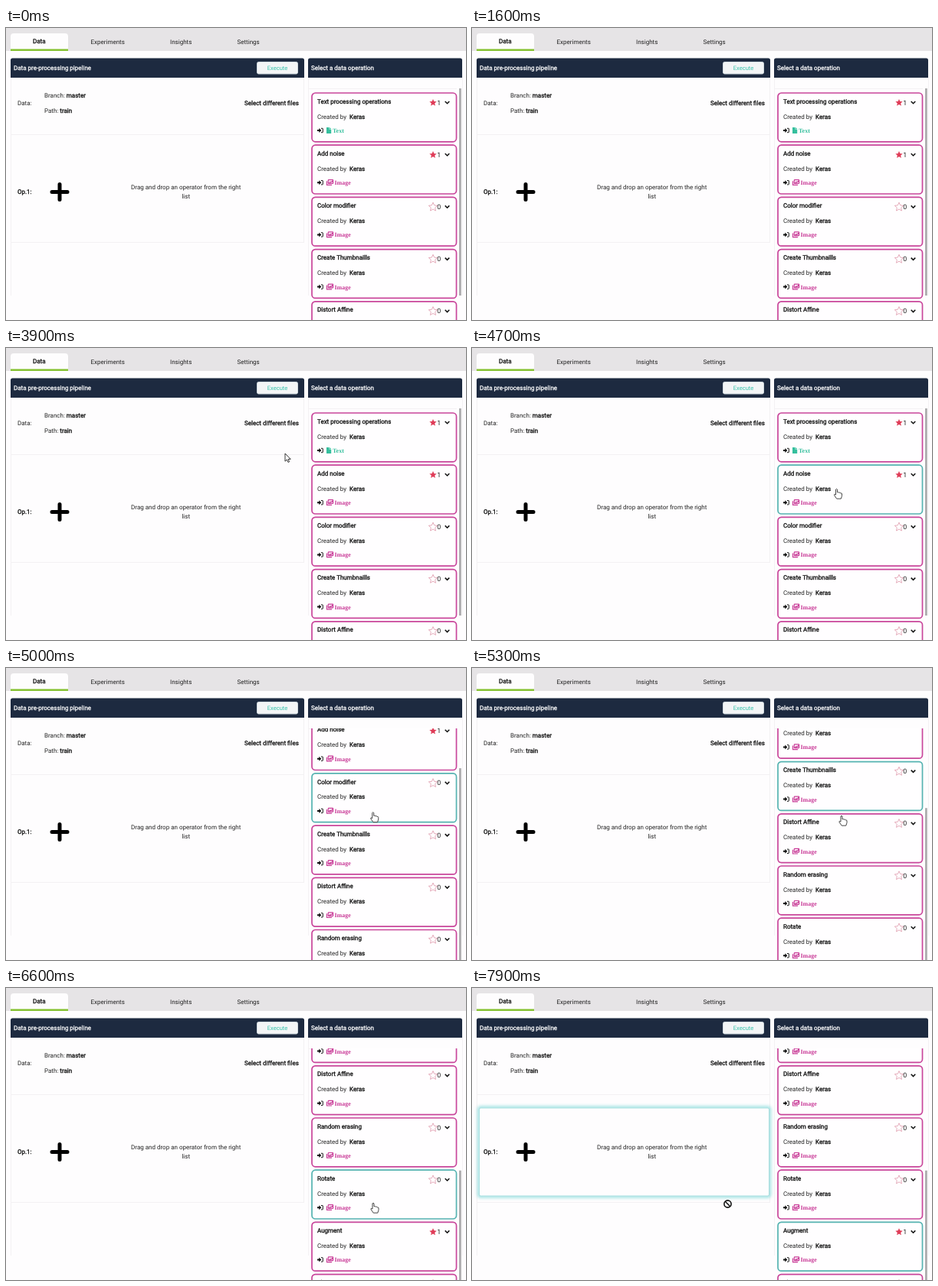
Recreate the animation shown at these times as an HTML page. Size 600 by 382 pixels, loop 8 s.

```html
<!DOCTYPE html>
<html>
<head>
<meta charset="utf-8">
<style>
html, body { margin: 0; width: 100%; height: 100%; overflow: hidden; background: #fefdfe; }
svg { display: block; width: 600px; height: 382px; }
text { font: 8px Roboto, sans-serif; fill: #222; white-space: pre; text-rendering: geometricPrecision; }
.b { fill: #0c0c0c; stroke: #0c0c0c; stroke-width: .3px; }
.w { fill: #fff; stroke: #fff; stroke-width: .3px; }
.tag { font: bold 8px "Liberation Serif", serif; }
.count { font-size: 8.8px; }
.line { fill: none; stroke: #f3f1f3; }
.box { fill: #fffeff; stroke: #c9469b; stroke-width: 1.7; }
.hover .box { stroke: #55b3b1; }
</style>
</head>
<body>
<svg viewBox="0 0 600 382">
  <defs>
    <clipPath id="view"><rect x="394" y="79" width="201" height="303"/></clipPath>
    <filter id="blur" x="-10%" y="-20%" width="120%" height="140%"><feGaussianBlur stdDeviation="2"/></filter>
  </defs>
  <rect width="600" height="30" fill="#e6e4e6"/>
  <path d="M6 30V11q0-4 4-4h67q4 0 4 4V30z" fill="#fefdfe"/>
  <path d="M6 27.5H81V30H6z" fill="#86c232"/>
  <text x="35" y="20" class="b">Data</text>
  <text x="110.5" y="21">Experiments</text>
  <text x="214" y="21">Insights</text>
  <text x="301.5" y="21">Settings</text>

  <path class="line" d="M6.5 65V350M388.5 65V280M6 139.5H389M6 280.5H389M394.5 65V350M595.5 65V350M394 79.5H588"/>
  <path d="M6 65V42q0-2.5 2.5-2.5H386.5q2.500 0 2.500 2.500V65zM394 65V42q0-2.500 2.500-2.500H592.500q2.500 0 2.500 2.500V65z" fill="#1d2a40"/>
  <text x="10" y="54.700" class="w">Data pre-processing pipeline</text>
  <text x="398" y="54.700" class="w">Select a data operation</text>
  <rect x="327.500" y="44.500" width="53" height="15.500" rx="2" fill="#f3f5f6" stroke="#cfd9de"/>
  <text x="354" y="55" text-anchor="middle" style="font-size:7.6px;fill:#3cc4ae">Execute</text>

  <text x="15" y="101">Data:</text>
  <text x="50" y="91">Branch: <tspan class="b">master</tspan></text>
  <text x="50" y="111">Path: <tspan class="b">train</tspan></text>
  <text x="311" y="101" class="b">Select different files</text>

  <g id="zone">
    <rect x="9" y="156.500" width="379" height="116" rx="2" fill="none" stroke="#35c4c4" stroke-width="3" opacity=".65" filter="url(#blur)"/>
    <rect x="9.500" y="157" width="378" height="115" rx="2" fill="#fefdfe" stroke="#a9dfe0"/>
  </g>
  <text x="15" y="217.200" class="b">Op.1:</text>
  <path d="M60 214.600H80M70 204.600V224.600" stroke="#000" stroke-width="5" stroke-linecap="round"/>
  <text x="234.700" y="211" text-anchor="middle">Drag and drop an operator from the right</text>
  <text x="234.700" y="223" text-anchor="middle">list</text>

  <g clip-path="url(#view)"><g id="list"></g></g>
  <rect id="thumb" x="591" y="79" width="2.800" height="271" fill="#adacae"/>

  <g id="arrow"><path d="M0 0V10.200L2.400 8L4 11.500L5.600 10.800L4.100 7.400H7.200z" fill="#fff" stroke="#222" stroke-width=".9"/></g>
  <g id="hand"><path d="M-1 1Q0-.6 1 1V4.800Q2.500 4.200 3.200 5.200Q4.600 4.700 5.200 5.800Q6.800 5.500 7 7V9.500L5.800 13.200H.2L-3 8.600Q-3.600 6.600-1 8z" fill="#fff" stroke="#333" stroke-width=".9"/></g>
  <g id="ban" fill="none" stroke="#111" stroke-width="1.600"><circle r="4.600" fill="#fff"/><path d="M-3.200-3.200L3.200 3.200"/></g>
</svg>
<script>
const LOOP = 8000, STEP = 100, PITCH = 68.2;
const $ = id => document.getElementById(id);

const ops = [["Text processing operations", 1], ["Add noise", 1], ["Color modifier", 0],
  ["Create Thumbnaills", 0], ["Distort Affine", 0], ["Random erasing", 0],
  ["Rotate", 0], ["Augment", 1], ["Flip", 0]];

function star(r) {
  const pts = Array.from({ length: 10 }, (_, i) => {
    const a = i * Math.PI / 5, d = i % 2 ? r * .47 : r;
    return (557 + d * Math.sin(a)).toFixed(2) + "," + (12.8 - d * Math.cos(a)).toFixed(2);
  });
  return pts.join(" ");
}

const fileTag = `<g fill="#35bf9d"><path d="M418 45h3.600v2.600h2.600V53H418z"/>
  <path d="M422.200 45l2 2h-2z"/><text class="tag" x="426" y="52" style="fill:#35bf9d">Text</text></g>`;
const imageTag = `<g fill="none" stroke="#c93c98" stroke-width="1.200"><rect x="420.300" y="45.500" width="6.300" height="4.800" rx=".5"/>
  <path d="M418.500 47V52.200H425M421 50l1.800-1.800l1 .8l1.700-1.800l1 1.500"/></g>
  <text class="tag" x="428.500" y="52" style="fill:#c93c98">Image</text>`;

$("list").innerHTML = ops.map(([name, stars], i) => `<g transform="translate(0 ${85 + i * PITCH})">
  <rect class="box" x="399" y="0" width="188.500" height="63.800" rx="4.500"/>
  <text x="406" y="13.700" class="b">${name}</text>
  <text x="406" y="33.500">Created by</text><text x="448" y="33.500" class="b">Keras</text>
  <path d="M406 48h2.300v-2l3 3l-3 3V50H406z" fill="#111"/>
  <path d="M411 46.300h1.800q.5 0 .5.500v4.400q0 .5-.5.500H411" fill="none" stroke="#111"/>
  ${i ? imageTag : fileTag}
  <polygon points="${star(stars ? 4.9 : 6)}" ${stars ? 'fill="#df3c58"' : 'fill="none" stroke="#e3a3b4" stroke-width=".9"'}/>
  <text x="562.200" y="15.500" class="count">${stars}</text>
  <path d="M572.700 11l2.800 2.800l2.800-2.800" fill="none" stroke="#111" stroke-width="1.500"/>
</g>`).join("");
const cards = [...$("list").children];

const pointer = [[2800, 242, 112], [2900, 270, 105], [3600, 270, 105], [3900, 364, 138],
  [4500, 475.5, 184], [4700, 475.5, 184], [5300, 482, 193], [6000, 482, 193],
  [6300, 482, 232], [6900, 476, 330], [7400, 476, 330], [7900, 333.5, 282.5]];
const scroll = [[4700, 0], [5300, 167], [5600, 256]];
const hovers = [[0, -1], [4200, 1], [4900, 2], [5200, 3], [5500, 5], [6400, 6], [6700, 7]];

function tween(keys, t) {
  const n = keys.findIndex(k => k[0] > t);
  if (n < 0) return keys[keys.length - 1].slice(1);
  if (!n) return keys[0].slice(1);
  const a = keys[n - 1], b = keys[n], p = (t - a[0]) / (b[0] - a[0]);
  return a.slice(1).map((v, i) => v + (b[i + 1] - v) * p);
}

const show = (id, on) => $(id).style.display = on ? "" : "none";

function draw(t) {
  const [x, y] = tween(pointer, t), [top] = tween(scroll, t);
  const active = hovers.filter(h => h[0] <= t).pop()[1];
  $("list").setAttribute("transform", `translate(0 ${-top})`);
  $("thumb").setAttribute("y", 79 + top * .624);
  cards.forEach((c, i) => c.classList.toggle("hover", i === active));

  const kind = t < 2800 ? "" : t >= 7600 ? "ban" : active < 0 ? "arrow" : "hand";
  for (const id of ["arrow", "hand", "ban"]) {
    show(id, id === kind);
    $(id).setAttribute("transform", `translate(${x} ${y})`);
  }
  show("zone", t >= 7500);
}

const start = performance.now();
function tick() {
  const t = (performance.now() - start) % LOOP;
  draw(Math.floor(t / STEP) * STEP);
  requestAnimationFrame(tick);
}
tick();
</script>
</body>
</html>
```
